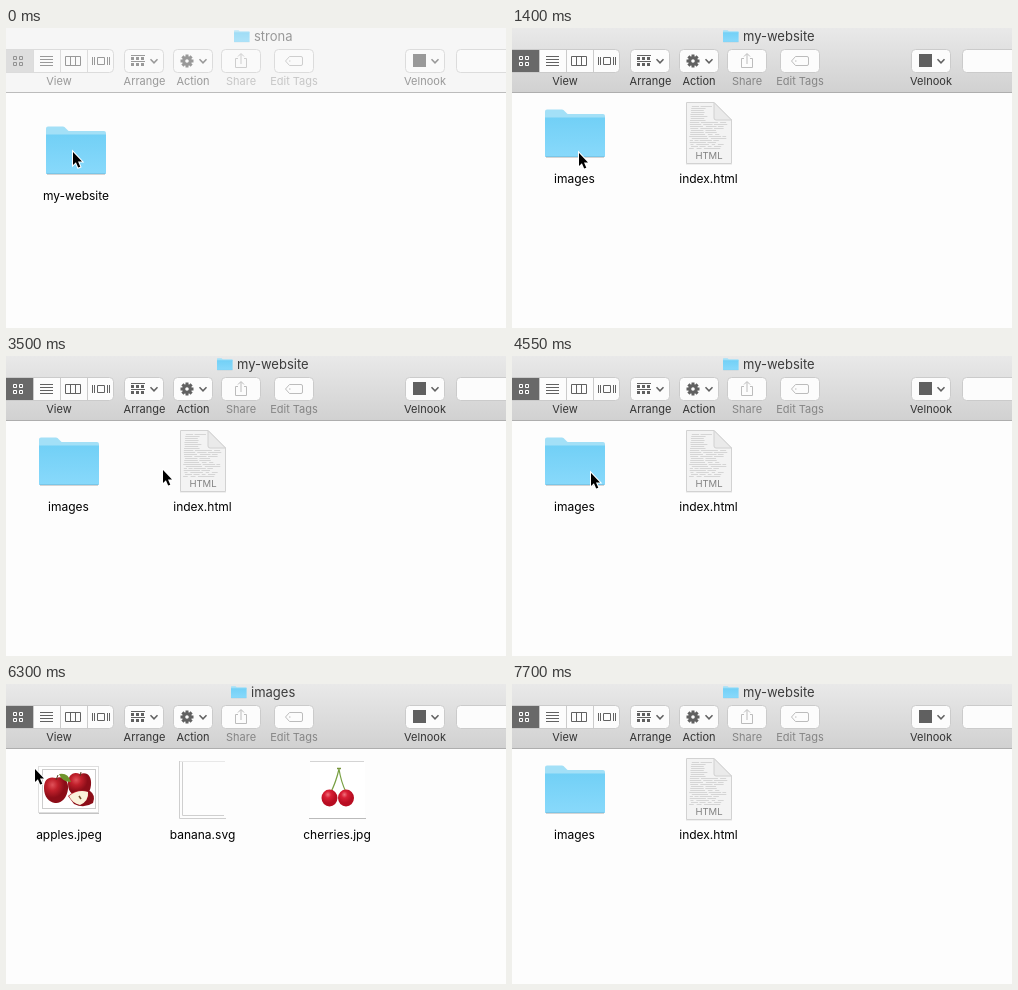
Animation of 500 by 300 pixels, one loop 8000 ms. Source, as an HTML page:

```html
<!DOCTYPE html>
<html lang="en">
<head>
<meta charset="utf-8">
<title>Browsing folders</title>
<style>
html, body { margin: 0; width: 100%; height: 100%; overflow: hidden; background: #fdfdfd; }
svg { display: block; width: 500px; height: 300px; font: 12px Inter, Roboto, sans-serif; }
text { text-anchor: middle; }
.title { font-size: 13px; fill: #3c3c3c; text-anchor: start; }
.tool text { font-size: 11px; fill: #333; }
.tool .button { fill: #fcfcfc; stroke: #cbcbcb; }
.tool .line { fill: none; stroke: #616161; }
.tool .solid { fill: #606060; }
.bar { fill: url(#bar); }
.edge { fill: #aeaeae; }
.chosen { fill: #696969; }
.onChosen { fill: none; stroke: #fff; }
.needsItem text { fill: #858585; }
.tool .needsItem .line { stroke: #bcbcbc; }
.picked .needsItem text { fill: #333; }
.picked .tool .needsItem .line { stroke: #616161; }
.inactive .bar { fill: #f6f6f6; }
.inactive .edge { fill: #bcbcbc; }
.inactive .title, .inactive .tool text { fill: #999; }
.inactive .tool .button { fill: #fafafa; stroke: #dcdcdc; }
.inactive .tool .line { stroke: #999; }
.inactive .tool .solid { fill: #999; }
.inactive .chosen { fill: #dedede; }
.inactive .onChosen { stroke: #929292; }
.inactive .tool .needsItem text { fill: #c6c6c6; }
.inactive .tool .needsItem .line { stroke: #cecece; }
.inactive #titleIcon { opacity: .65; }
.halo { fill: #dedede; }
.tag { fill: #0b64d6; }
.inactive .tag { fill: #cacaca; }
.halo, .tag { visibility: hidden; }
.picked .halo, .picked .tag { visibility: visible; }
.picked .name { fill: #fff; }
.picked.inactive .name { fill: #4a4a4a; }
</style>
</head>
<body>
<svg id="stage" viewBox="0 0 500 300">
  <defs>
    <linearGradient id="bar" x2="0" y2="1">
      <stop stop-color="#e9e9e9"/><stop offset="1" stop-color="#d1d1d1"/>
    </linearGradient>
    <linearGradient id="front" x2="0" y2="1">
      <stop stop-color="#72d0f6"/><stop offset="1" stop-color="#88d9fb"/>
    </linearGradient>
    <radialGradient id="red" cx=".35" cy=".3">
      <stop stop-color="#e0525a"/><stop offset=".45" stop-color="#c0202b"/><stop offset="1" stop-color="#8c0d18"/>
    </radialGradient>
    <radialGradient id="cherry" cx=".4" cy=".3">
      <stop stop-color="#f0707c"/><stop offset=".4" stop-color="#d91f35"/><stop offset="1" stop-color="#b80d22"/>
    </radialGradient>
    <g id="folder">
      <path d="M1 48.500H59" stroke="#000" stroke-opacity=".16"/>
      <path d="M0 10V2.500Q0 .5 2 .5H17Q18.500 .5 20 2.500L22 4.500Q22.500 5 24 5H58Q60 5 60 7V12H0Z" fill="#a3e0f7"/>
      <path d="M0 8.500H60V46.500Q60 48 58.500 48H1.500Q0 48 0 46.500Z" fill="url(#front)"/>
      <path d="M.5 47.500H59.500" stroke="#78c6e8"/>
    </g>
    <path id="chevron" d="M-3.500-1.800L0 1.800 3.500-1.800" stroke-width="1.500"/>
  </defs>

  <rect width="500" height="300" fill="#fdfdfd"/>
  <rect class="bar" width="500" height="64"/>
  <rect class="edge" y="64" width="500" height="1"/>
  <g id="titleIcon"></g>
  <text id="title" class="title" y="13"></text>
  <g id="tools" class="tool"></g>

  <g id="site">
    <rect class="halo" x="34" y="86" width="72" height="72" rx="4"/>
    <use href="#folder" x="40" y="98"/>
    <rect class="tag" x="33" y="160" width="74" height="15" rx="3"/>
    <text class="name" x="70" y="172">my-website</text>
  </g>

  <g id="files">
    <rect class="halo" x="27" y="69" width="72" height="72" rx="4"/>
    <use href="#folder" x="33" y="81"/>
    <rect class="tag" x="38" y="143" width="48" height="15" rx="3"/>
    <text class="name" x="62.500" y="155">images</text>
    <path d="M174 136H220" stroke="#e2e2e2"/>
    <path d="M174.500 74.500H202L219.500 92V135.500H174.500Z" fill="#f3f3f3" stroke="#d2d2d2"/>
    <path id="code" fill="none" stroke="#cecece" stroke-width=".8"/>
    <path d="M202 74.500V90Q202 92 204 92H219.500Z" fill="#eaeaea" stroke="#d0d0d0"/>
    <text x="197" y="131" style="font-size:9.500px" fill="#808080">HTML</text>
    <text x="196.500" y="155">index.html</text>
  </g>

  <g id="pictures">
    <path d="M33 129.500H93" stroke="#c4c4c4"/>
    <rect x="32.500" y="82.500" width="60" height="46" fill="#fff" stroke="#dedede"/>
    <rect x="36.500" y="85.500" width="53" height="39" fill="#fff" stroke="#ccc"/>
    <g fill="url(#red)">
      <path d="M50 94C57 91 63 96 62 105S55 120 49 119 38 113 38 104 43 92 50 94Z"/>
      <path d="M74 90C81 87 86 92 85 101S80 112 74 112 62 109 62 100 67 87 74 90Z"/>
      <path d="M62 112Q71 104 84 107 90 111 87 119 78 125 68 120Z"/>
    </g>
    <path d="M63 112Q72 105 82 108 83 117 74 121 66 119 63 112Z" fill="#fbf3dc"/>
    <path d="M73 112l2 3" stroke="#77512f" stroke-width="1.500"/>
    <path d="M53 90Q62 88 65 98 56 98 53 90Z" fill="#70952e"/>
    <path d="M50 96L52 91M74 92L75 88" stroke="#5d3b21"/>
    <text x="63" y="155">apples.jpeg</text>

    <path d="M173.500 77V134.500H220M176.500 78V131.500H218" fill="none" stroke="#cfcfcf"/>
    <path d="M174 77.500H219" stroke="#e8e8e8"/>
    <text x="196.500" y="155">banana.svg</text>

    <path d="M304 77.500H358" stroke="#d4d4d4"/>
    <path d="M303 134.500H360" stroke="#bbb"/>
    <rect x="304" y="78" width="55" height="56" fill="#fff"/>
    <path d="M325 108Q330 98 333 85 335 98 340 108" fill="none" stroke="#78a043" stroke-width="1.200"/>
    <path d="M331 84.500H335" stroke="#78953d" stroke-width="1.500"/>
    <g fill="url(#cherry)"><ellipse cx="323.500" cy="114" rx="8" ry="8.500"/><ellipse cx="340" cy="114" rx="8" ry="8.500"/></g>
    <text x="331" y="155">cherries.jpg</text>
  </g>

  <g id="cursor">
    <path d="M1 1V14L3.900 11.300 6.200 16.600 8.300 15.700 6 10.500H10Z" stroke="#fff" stroke-width="2" paint-order="stroke"/>
  </g>
</svg>
<script>
const $ = id => document.getElementById(id);
const chevron = x => `<use href="#chevron" class="line" x="${x}" y="33"/>`;
const line = d => `<path class="line" d="${d}"/>`;
const solid = d => `<path class="solid" d="${d}"/>`;
const tool = (x, width, label, center, icon, type = "") => `<g class="${type}">
  <rect class="button" x="${x}.5" y="21.500" width="${width}" height="23" rx="4"/>
  ${icon}<text x="${center}" y="57">${label}</text></g>`;

const squares = (xs, ys, size) => ys.map(y => xs.map(x => `M${x} ${y}h${size}v${size}h-${size}z`).join("")).join("");
const teeth = Array.from({ length: 8 }, (_, i) =>
  `<rect class="solid" x="179.500" y="26.500" width="3" height="4" transform="rotate(${i * 45} 181 33)"/>`).join("");

$("tools").innerHTML =
  tool(-9, 117, "View", 53,
    `<path class="chosen" d="M0 22H27V44H0Z"/>
     <path class="onChosen" d="${squares([7.5, 13.5], [28.5, 34.5], 3)}"/>
     <path class="button" d="M27.500 22V44M54.500 22V44M81.500 22V44"/>` +
    line("M34 28.500H47M34 31.500H47M34 34.500H47M34 37.500H47") +
    line("M59.500 28.500H74.500V37.500H59.500ZM64.500 28V38M69.500 28V38") +
    line("M91.500 29.500H98.500V36.500H91.500ZM86.500 29V37M88.500 29V37M101.500 29V37M103.500 29V37")) +
  tool(118, 39, "Arrange", 138.5,
    line("M125 27.500H139M125 33.500H139") + solid(squares([125, 130, 135], [29, 35], 3)) + chevron(148)) +
  tool(167, 39, "Action", 187,
    teeth + `<circle cx="181" cy="33" r="3.300" class="line" stroke-width="3"/>` + chevron(197)) +
  tool(215, 39, "Share", 235,
    line("M232 30.500H229.500V39.500H240.500V30.500H238M235 36V26M232 28.500L235 25.500 238 28.500"), "needsItem") +
  tool(268, 39, "Edit Tags", 288,
    line("M279.500 33L283.500 28.500H295Q296.500 28.500 296.500 30V36Q296.500 37.500 295 37.500H283.500ZM283 33h1.500"), "needsItem") +
  tool(399, 39, "Velnook", 419, solid("M407 26h13v13h-13z") + chevron(429)) +
  tool(450, 70, "", 0, "");

// Broken rows of tiny code inside the document icon
let seed = 7;
const random = () => (seed = seed * 16807 % 2147483647) / 2147483647;
let rows = "";
for (let y = 78; y < 121; y += 2) {
  const end = (y < 93 ? 200 : 216) - random() * 12;
  for (let x = 177 + random() * 3; x < end - 3;) {
    const next = Math.min(end, x + 3 + random() * 15);
    rows += `M${x} ${y}.5H${next}`;
    x = next + 1 + random() * 2;
  }
}
$("code").setAttribute("d", rows);

const STEP = 350, LOOP = 8000;
// Start time, view, window state
const scenes = [
  [0, "site", "inactive"],
  [700, "site", "inactive picked"],
  [1050, "site", "picked"],
  [1400, "files", ""],
  [5600, "files", "picked"],
  [6300, "pictures", ""],
  [7700, "files", ""]
];
const titles = { site: ["strona", 228], files: ["my-website", 211], pictures: ["images", 225] };
// Pointer position per step; it leaves after the last one
const pointer = [
  [66, 123], [66, 124], [66, 124], [66, 124], [66, 124],
  [80, 132], [125, 136], [180, 133], [195, 110], [178, 109], [156, 113],
  [130, 122], [95, 120], [78, 116], [79, 113], [80, 111], [80, 111], [80, 111],
  [28, 84], [28, 3]
];

let shown = -1;
function draw(now) {
  const time = now % LOOP, step = Math.min(22, Math.floor(time / STEP));
  if (step !== shown) {
    shown = step;
    const [, view, state] = scenes.findLast(scene => scene[0] <= step * STEP);
    const [name, x] = titles[view];
    $("stage").setAttribute("class", state);
    for (const id in titles) $(id).style.display = id === view ? "" : "none";
    $("title").textContent = name;
    $("title").setAttribute("x", x + 20);
    $("titleIcon").innerHTML = `<use href="#folder" transform="translate(${x} 2) scale(.26 .25)"/>`;
    const tip = pointer[step];
    $("cursor").style.display = tip ? "" : "none";
    if (tip) $("cursor").setAttribute("transform", `translate(${tip})`);
  }
  requestAnimationFrame(draw);
}
draw(performance.now());
</script>
</body>
</html>
```
